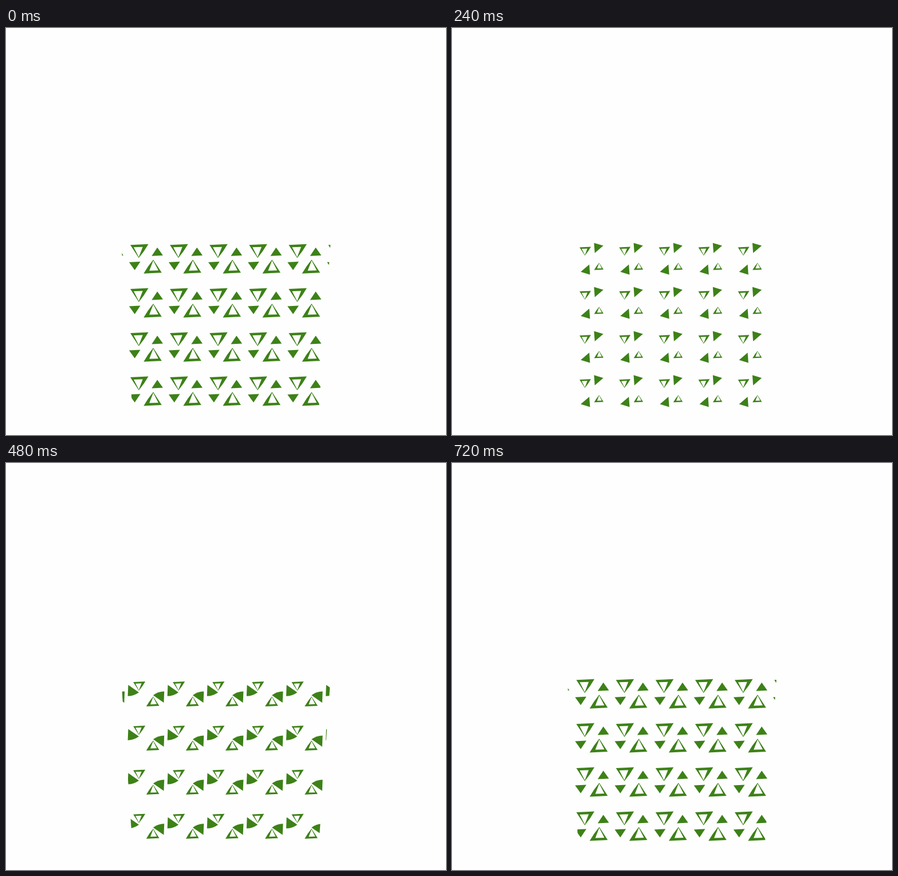
An HTML page with a canvas that plays this animation: 779x719 px, repeating every 750 ms.

```html
<!DOCTYPE html>
<html>
<head>
<meta charset="utf-8">
<style>
html, body { margin: 0; height: 100%; overflow: hidden; background: #fefefe; }
canvas { display: block; }
</style>
</head>
<body>
<canvas id="stage" width="779" height="719"></canvas>
<script>
const ctx = document.getElementById('stage').getContext('2d');
const STEP = 30, STEPS = 25, PITCH_X = 70.1, PITCH_Y = 77.9;

// Sizes over the loop, at the steps listed in KEYS
const KEYS = [0, 4, 8, 11, 12, 16, 20, 24];
const UPPER = [1, .88, .63, .42, .42, .67, .86, 1];
const LOWER = [1, .77, .52, .39, .40, .72, .88, 1];
const ORBIT = [1, 1, 1, 1.03, 1.14, 1.15, 1.02, 1];

function sample(values, step) {
  let i = 1;
  while (KEYS[i] < step) i++;
  const k = (step - KEYS[i - 1]) / (KEYS[i] - KEYS[i - 1]);
  return values[i - 1] + (values[i] - values[i - 1]) * k;
}

const ease = p => p * p * p * (p * (6 * p - 15) + 10);

// Shapes are relative to the middle of a tile
const hollow = new Path2D('M-15.5-11.5 L16.5-13 Q9.5-.5-.5 11.5 Z M-9.5-7.5 L-.5 10 L6.5-8 Z');

function solidPath(scale) {
  const bulge = Math.max(0, scale - 1.03) / .2;
  return new Path2D(`M20-20 L30-6 L10-5 Q${15 - 4 * bulge} ${-12.5 - 2.7 * bulge} 20-20 Z`);
}

function place(shape, angle, x, y, scale) {
  ctx.save();
  ctx.rotate(angle);
  ctx.translate(x, y);
  ctx.scale(scale, scale);
  ctx.fill(shape, 'evenodd');
  ctx.restore();
}

function draw(now) {
  const step = Math.floor(now / STEP) % STEPS;
  const upper = sample(UPPER, step);
  const lower = sample(LOWER, step);
  const orbit = sample(ORBIT, step);
  const turn = -Math.PI * ease(step / (STEPS - 1));
  const solid = solidPath(orbit);

  ctx.fillStyle = '#fefefe';
  ctx.fillRect(0, 0, 779, 719);
  ctx.save();
  ctx.clip(new Path2D('M202.5 360 H576 L553 686 H224.5 Z'));
  ctx.fillStyle = '#3d8118';
  for (let row = -1; row < 5; row++) {
    for (let col = -1; col < 6; col++) {
      ctx.save();
      ctx.translate(247.9 + col * PITCH_X, 407.7 + row * PITCH_Y);
      place(hollow, 0, -12.3, -13, upper);
      place(hollow, Math.PI, -12.3, -13, lower);
      place(solid, turn, 0, 0, orbit);
      place(solid, turn + Math.PI, 0, 0, orbit);
      ctx.restore();
    }
  }
  ctx.restore();
}

function tick() {
  draw(performance.now());
  requestAnimationFrame(tick);
}
tick();
</script>
</body>
</html>
```
